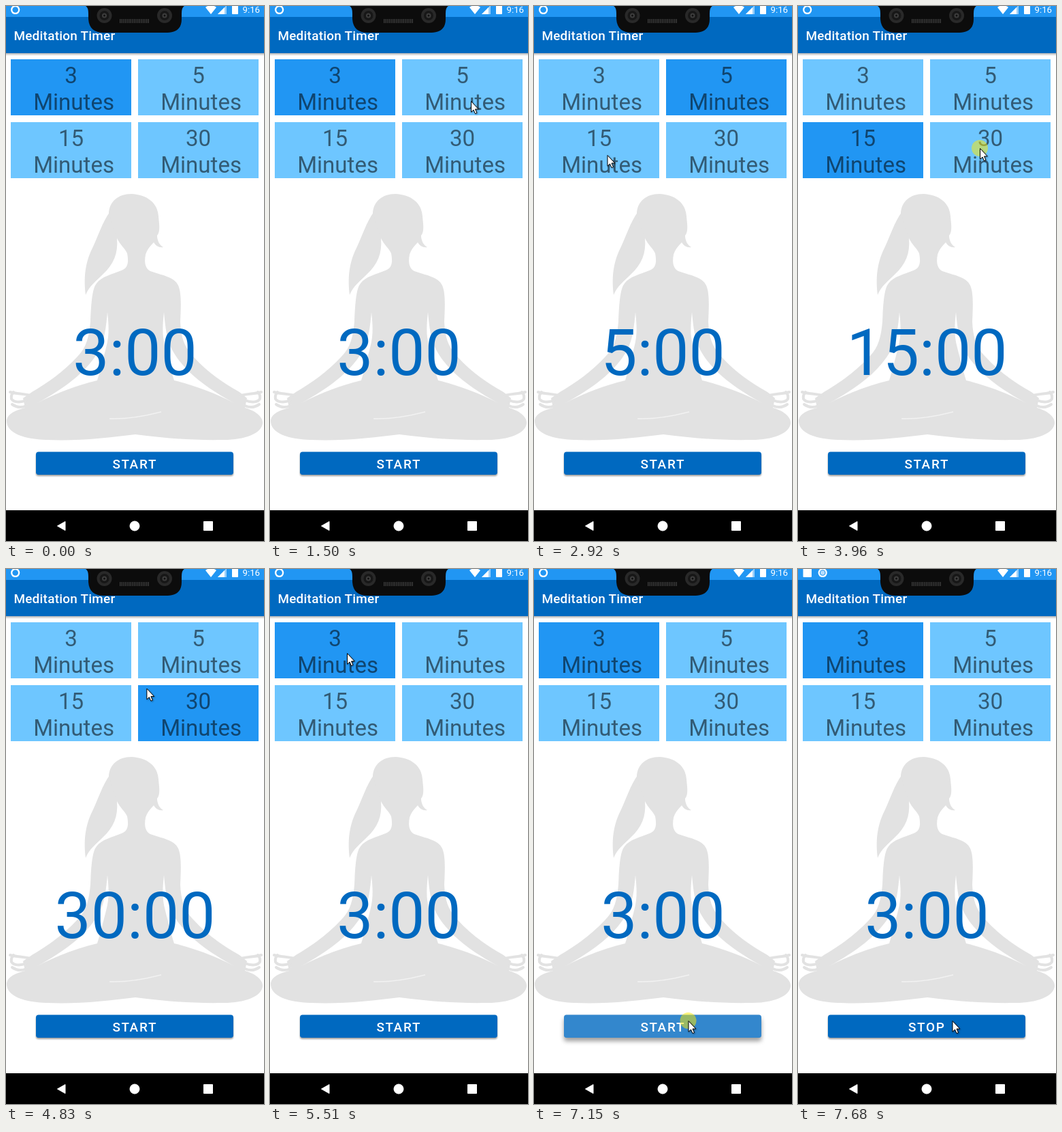
An HTML page for the animation above (8000 ms loop, 379x783 px).

```html
<!DOCTYPE html>
<html lang="en">
<head>
<meta charset="utf-8">
<title>Meditation Timer</title>
<style>
html, body { margin: 0; width: 100%; height: 100%; overflow: hidden; background: #fff; }
svg { display: block; width: 100%; height: 100%; font-family: Roboto, sans-serif; }
.mid { text-anchor: middle; }
.label { font-size: 33.1px; fill: rgba(0,0,0,.54); white-space: pre; }
.med { font-size: 18.95px; font-weight: 500; fill: #fff; }
#cursor { filter: drop-shadow(1px 1px 1px rgba(0,0,0,.35)); }
</style>
</head>
<body>
<svg viewBox="0 0 379 783" preserveAspectRatio="none">
  <defs>
    <linearGradient id="fade" x2="0" y2="1">
      <stop stop-opacity=".3"/><stop offset="1" stop-opacity="0"/>
    </linearGradient>
    <clipPath id="btnClip"><rect x="44" y="652.5" width="290" height="33.5" rx="3.8"/></clipPath>
    <g id="limb">
      <path fill="#fff" d="M149 448C151 468 152 482 147 500C142 520 138 535 134 548C105 555 75 566 46 581C85 560 120 535 137 503C145 488 147 470 149 448Z"/>
      <path fill="none" stroke="#e2e2e2" stroke-width="4" stroke-linecap="round" d="M36 570C24 567 17 568 6 565M30 577C20 581 11 580 8 575Q7 569 11 565M30 585Q19 590 9 583"/>
    </g>
  </defs>
  <rect width="379" height="783" fill="#fff"/>

  <g id="figure" fill="#e2e2e2" style="filter:blur(.5px)">
    <path d="M152 302C141 318 136 335 128 352C119 370 113 390 117 423C122 410 133 402 143 392C158 378 165 362 163 340L172 328Z"/>
    <path d="M151 303C152 286 165 275 184 275C207 276 223 288 224 308C225 320 227 329 222 336C222 344 226 350 231 353C225 354 220 351 217 346C212 351 207 357 205 364C203 374 204 384 212 388C228 394 247 396 253 409C258 420 257 440 256 462C257 485 262 500 276 514C296 536 320 552 343 565L354 574L351 588C365 592 377 600 377 610C376 626 350 635 320 635C270 636 230 632 190 627C150 632 105 637 60 635C25 634 0 625 1 606C3 596 14 592 28 588L25 574L38 565C60 552 85 535 105 513C118 500 122 485 124 462C125 440 126 414 133 406C140 396 155 393 172 386C180 382 180 372 178 362C175 355 168 350 163 340Z"/>
    <use href="#limb"/>
    <use href="#limb" transform="matrix(-1 0 0 1 381 0)"/>
    <path fill="none" stroke="#f2f2f2" stroke-width="1.5" d="M152 604C180 605 205 600 228 594"/>
  </g>

  <rect y="69" width="379" height="4" fill="url(#fade)"/>
  <rect width="379" height="16" fill="#2196f3"/>
  <rect y="16" width="379" height="53" fill="#0069c0"/>
  <text class="med" x="11.4" y="50" letter-spacing=".237">Meditation Timer</text>

  <g fill="#fff">
    <path d="M293 2Q301 -4 309 2L301 12Z"/>
    <path d="M324 -1V12H311Z" opacity=".55"/>
    <path d="M321 2V12H311Z"/>
    <rect x="332" y="-2" width="9" height="14" rx="1"/>
    <text x="347.5" y="10" font-size="13.26">9:16</text>
    <rect id="note" x="7.5" y="-1" width="12.5" height="13" rx="1"/>
    <g id="ring">
      <circle cy="5.5" r="6.6"/>
      <circle cy="5.5" r="4.3" fill="#2196f3"/>
      <circle id="core" cy="5.5" r="3.2" opacity="0" fill="#b7dcfb"/>
    </g>
  </g>

  <path fill="#0c0c0c" d="M117 0Q121 2 121 11V19C122 33 130 39 143 39H237C250 39 258 33 258 19V11Q258 2 262 0Z"/>
  <g id="cams"></g>
  <path stroke="#3c3c3c" stroke-width="6" stroke-dasharray="1.4 1.2" d="M167 22H211"/>

  <g id="cards"></g>
  <text id="timer" class="mid" x="189.5" y="539.5" font-size="94.7" fill="#0069c0"></text>

  <rect id="btn" x="44" y="652.5" width="290" height="33.5" rx="3.8" fill="#0069c0"/>
  <g clip-path="url(#btnClip)"><circle id="ripple" cx="227" cy="661" fill="#fff"/></g>
  <text id="action" class="med mid" x="189.3" y="677" letter-spacing="1.69"></text>

  <rect y="738" width="379" height="45" fill="#000"/>
  <g fill="#fff" stroke="#fff" stroke-linejoin="round">
    <path d="M75.5 761L87 754.5V767.5Z"/>
    <circle cx="189" cy="761" r="7"/>
    <rect x="290.5" y="754.5" width="13" height="13"/>
  </g>

  <circle id="tap" r="12" fill="#ffeb00" fill-opacity=".5"/>
  <path id="cursor" fill="#fff" stroke="#000" stroke-linejoin="round" d="M.5 .5V16.3L4 13L6.5 18.6L9 17.5L6.5 12H11.3Z"/>
</svg>
<script>
const LOOP = 8000;
const $ = id => document.getElementById(id);
const minutes = [3, 5, 15, 30];
// time, chosen card
const picks = [[0, 0], [1570, 1], [2990, 2], [4230, 3], [5510, 0]];
// first step, last step, step count, start, end, optional bend
const moves = [
  [330, 970, 10, [344, 768], [283, 146]],
  [1170, 1170, 1, [283, 146], [295, 139]],
  [1970, 2530, 9, [295, 139], [107.5, 218]],
  [3400, 3890, 8, [107.5, 218], [267, 208]],
  [4690, 5110, 7, [267, 208], [113, 123]],
  [5840, 6600, 12, [113, 123], [226, 656], [75, 300]],
  [6670, 6670, 1, [226, 656], [226.5, 661]]
];
const taps = [[1300, 1500], [2790, 2920], [3960, 4230], [5310, 5510], [6870, 7210]];

const clamp = v => Math.max(0, Math.min(1, v));
const ramp = (t, a, b) => clamp((t - a) / (b - a));
const ease = s => s * s * (3 - 2 * s);

$('cards').innerHTML = minutes.map((m, i) => {
  const x = 7 + i % 2 * 187, y = 78 + (i >> 1) * 92;
  return `<rect x="${x}" y="${y}" width="177" height="82"/>
    <text class="label mid" x="${x + 88.5}" y="${y + 35}">${m}</text>
    <text class="label mid" x="${x + 92.6}" y="${y + 73.6}">Minutes</text>`;
}).join('');
const cards = [...$('cards').querySelectorAll('rect')];

$('cams').innerHTML = [144.5, 233].map(x =>
  [[11, '#292929'], [7, '#171717'], [3.5, '#3d3d3d'], [1.5, '#111']].map(([r, c]) =>
    `<circle cx="${x}" cy="14" r="${r}" fill="${c}"/>`).join('')).join('');

function cursorAt(t) {
  const move = moves.filter(m => t >= m[0]).pop();
  if (!move) return null;
  const [t0, t1, n, a, b, bend] = move;
  const step = n > 1 ? Math.floor(ramp(t, t0, t1) * (n - 1) + 1e-6) : 0;
  const s = ease((step + 1) / n);
  return a.map((p, k) => {
    const c = bend ? bend[k] : (p + b[k]) / 2;
    return p * (1 - s) ** 2 + 2 * c * s * (1 - s) + b[k] * s * s;
  });
}

function render(t) {
  const pick = picks.filter(p => t >= p[0]).pop()[1];
  cards.forEach((c, i) => c.setAttribute('fill', i === pick ? '#2196f3' : '#6ec6ff'));
  $('timer').textContent = minutes[pick] + ':00';
  $('action').textContent = t < 7480 ? 'START' : 'STOP';

  const pos = cursorAt(t);
  $('cursor').style.display = pos ? '' : 'none';
  const tapped = pos && taps.some(([a, b]) => t >= a && t < b);
  $('tap').style.display = tapped ? '' : 'none';
  if (pos) for (const id of ['cursor', 'tap']) $(id).setAttribute('transform', `translate(${pos})`);

  const lift = ramp(t, 6870, 7010) * (1 - ramp(t, 7210, 7410));
  $('btn').style.filter = `drop-shadow(0 ${2 + 3 * lift}px ${1.2 + 2 * lift}px rgba(0,0,0,.38))`;
  $('ripple').setAttribute('r', 190 * ease(ramp(t, 6870, 7170)));
  $('ripple').setAttribute('opacity', .2 * lift);

  const slide = ramp(t, 7480, 7680);
  $('ring').setAttribute('transform', `translate(${13.7 + 22.5 * ease(slide)} 0)`);
  $('core').setAttribute('opacity', slide);
  $('note').setAttribute('opacity', slide);
}

const start = performance.now();
function tick() {
  render((performance.now() - start) % LOOP);
  requestAnimationFrame(tick);
}
tick();
</script>
</body>
</html>
```
